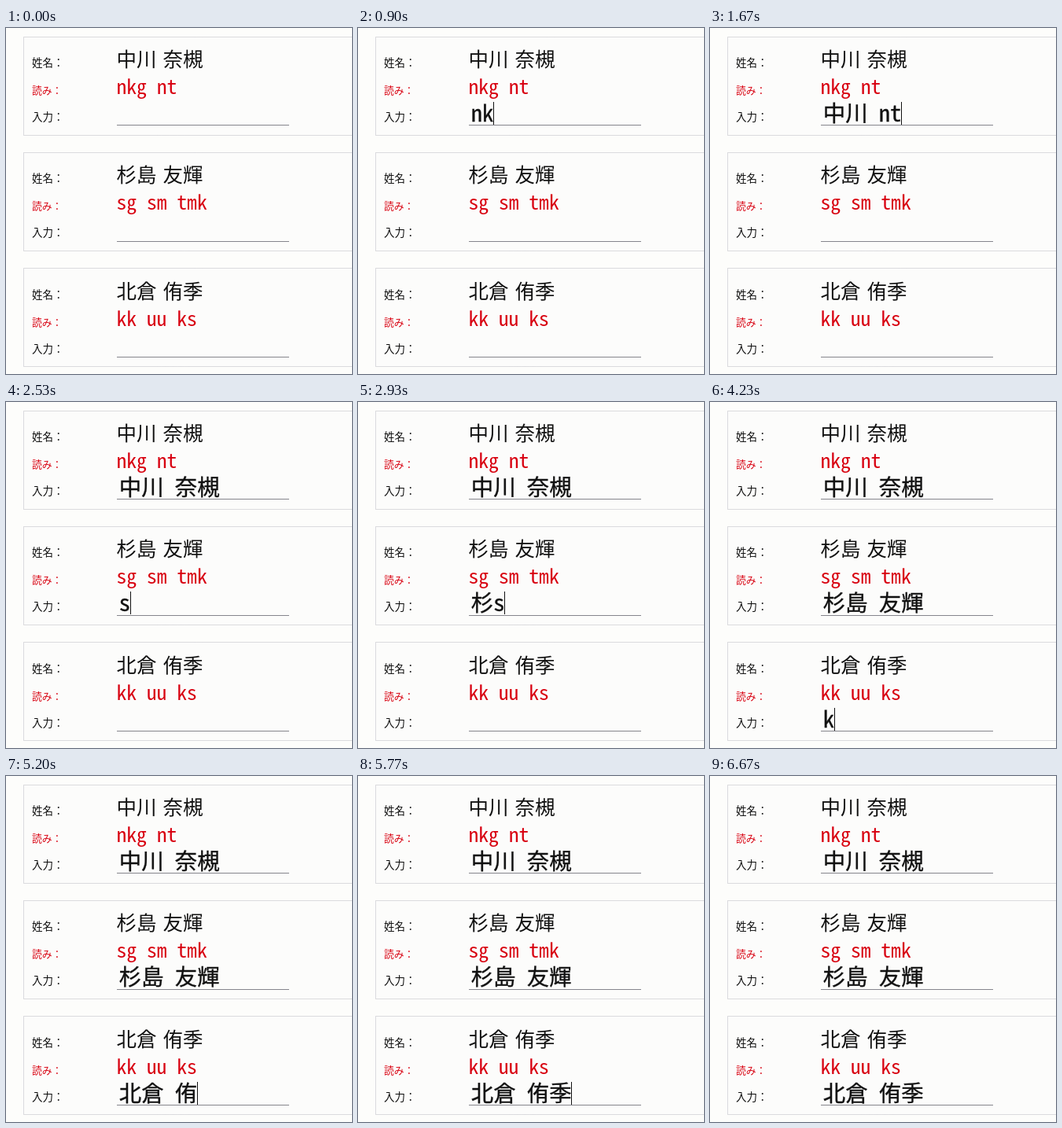
An HTML page for the animation above (8 s loop, 440 by 440 pixels).

```html
<!DOCTYPE html>
<html lang="ja">
<head>
<meta charset="utf-8">
<title>姓名入力</title>
<style>
html, body { margin: 0; width: 100%; height: 100%; overflow: hidden; background: #fdfdfb; }
svg { display: block; width: 440px; height: 440px; }
text { font-family: "Noto Sans CJK JP", "Noto Sans CJK", sans-serif; fill: #111; white-space: pre; }
.label { font-size: 13.5px; }
.small { font-size: 12.8px; }
.name { font-size: 25.5px; font-weight: 300; word-spacing: 2.3px; }
.code, .input { font-family: "Noto Sans Mono CJK JP", "Noto Sans CJK JP", "Noto Sans Mono", monospace; }
.code { font-size: 25.6px; }
.input { font-size: 28.4px; stroke: #111; stroke-width: .35px; }
.red { fill: #d80010; }
.box { fill: #fcfcfb; stroke: #b9b9c0; stroke-dasharray: 1 1; }
.line { fill: #85858c; }
</style>
</head>
<body>
<svg id="stage" viewBox="0 0 440 440"></svg>
<script>
const LOOP = 8000, BLINK_OFF = 6030, PITCH = 147.4, HALF = 14.2, LEFT = 143.8;
const people = [
  ["中川 奈槻", "nkg nt"],
  ["杉島 友輝", "sg sm tmk"],
  ["北倉 侑季", "kk uu ks"]
];

// [time, row, text in the field]
const steps = [
  [470, 0, ""], [700, 0, "n"], [830, 0, "nk"], [1000, 0, "中川"],
  [1340, 0, "中川 "], [1530, 0, "中川 n"], [1650, 0, "中川 nt"], [1970, 0, "中川 奈槻"],
  [2270, 1, ""], [2500, 1, "s"], [2700, 1, "杉"], [2870, 1, "杉s"],
  [2990, 1, "杉島"], [3130, 1, "杉島 "], [3220, 1, "杉島 t"], [3300, 1, "杉島 川辺"],
  [3390, 1, "杉島 川辺k"], [3510, 1, "杉島 友輝"],
  [3680, 2, ""], [4180, 2, "k"], [4480, 2, "北倉"], [4810, 2, "北倉 "],
  [5030, 2, "北倉 u"], [5170, 2, "北倉 侑"], [5330, 2, "北倉 侑k"], [5480, 2, "北倉 侑季"]
];

const textY = row => Math.round(row * PITCH);
const edgeY = (y, row) => Math.floor(y + row * PITCH);
const label = (y, s, cls = "label") => `<text class="${cls}" x="33" y="${y}">${s}</text>`;

const stage = document.getElementById("stage");
stage.innerHTML = people.map(([name, code], i) => `
  <rect class="box" x="22.5" y="${edgeY(11, i) + .5}" width="440" height="125"/>
  <rect class="line" x="141" y="${edgeY(123.6, i)}" width="219" height="1"/>
  <g transform="translate(0 ${textY(i)})">
    ${label(49, "姓名：")}
    ${label(84, "読み：", "small red")}
    ${label(117.5, "入力：")}
    <text class="name" x="140.5" y="48.5">${name}</text>
    <text class="code red" x="140.5" y="84">${code}</text>
    <text class="input" x="${LEFT}" y="118.5"></text>
  </g>`).join("") + '<rect id="caret" width="1" height="29" fill="#111"/>';

const fields = [...stage.querySelectorAll(".input")];
const caret = document.getElementById("caret");
const units = s => [...s].reduce((n, c) => n + (c < "\x7f" ? 1 : 2), 0);

function draw(t) {
  const done = steps.filter(s => s[0] <= t);
  const texts = ["", "", ""];
  for (const [, row, s] of done) texts[row] = s;
  fields.forEach((f, i) => { if (f.textContent !== texts[i]) f.textContent = texts[i]; });

  const last = done[done.length - 1];
  caret.style.display = last && t < BLINK_OFF ? "" : "none";
  if (last) {
    caret.setAttribute("x", Math.floor(LEFT + units(last[2]) * HALF));
    caret.setAttribute("y", textY(last[1]) + 94);
  }
}

const start = performance.now();
function tick() {
  draw((performance.now() - start) % LOOP);
  requestAnimationFrame(tick);
}
tick();
</script>
</body>
</html>
```
